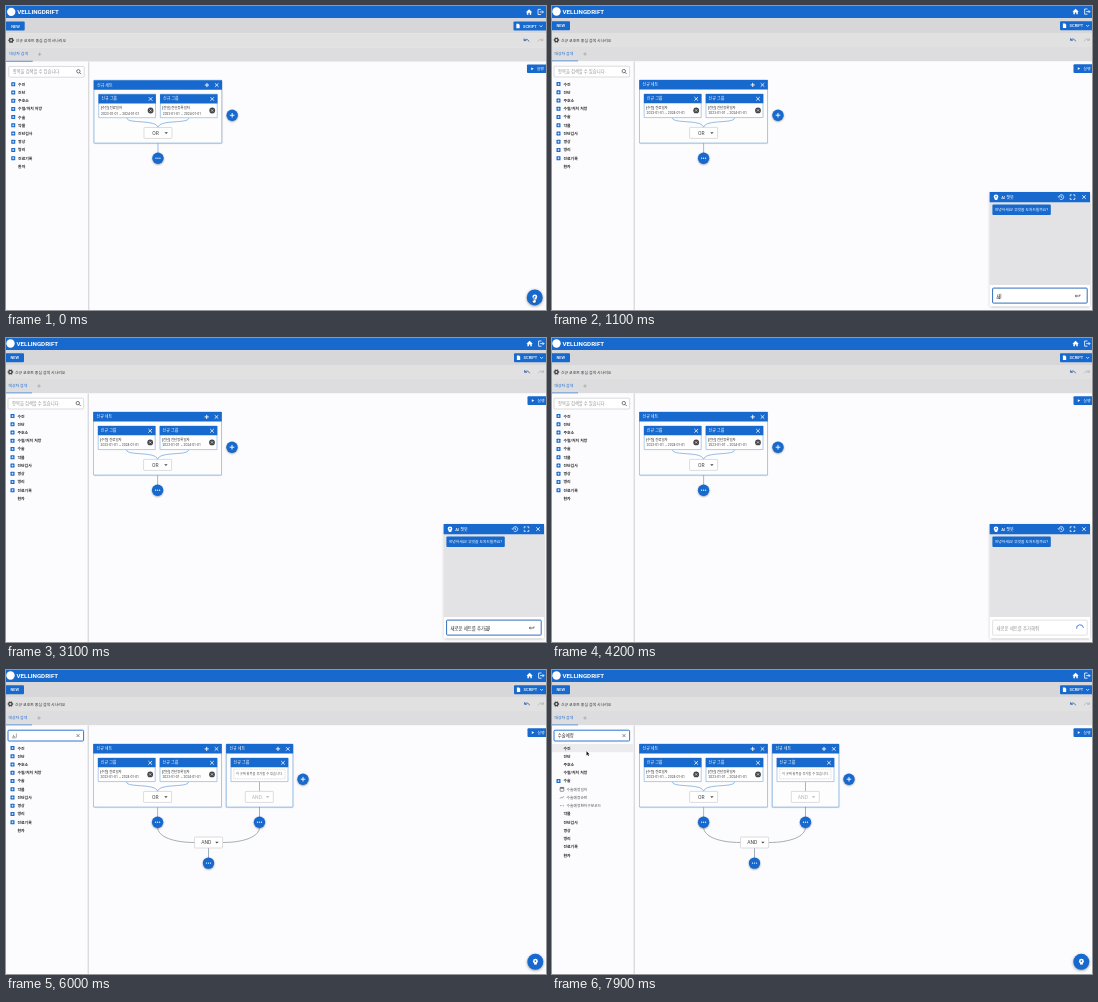
Recreate the animation shown at these times as an HTML page with a canvas. Size 540x304 px, loop 8 s.

```html
<!DOCTYPE html>
<html lang="ko">
<head>
<meta charset="utf-8">
<style>
html, body { margin: 0; width: 100%; height: 100%; overflow: hidden; background: #fcfbfd; }
canvas { display: block; width: 540px; height: 304px; }
</style>
</head>
<body>
<canvas id="stage"></canvas>
<script>
const W = 540, H = 304, LOOP = 8000;
const BLUE = '#1769cd', INK = '#2b2b2d', GREY = '#77777a', WHITE = '#fff', LINK = '#79aadd';
const canvas = document.getElementById('stage');
const ctx = canvas.getContext('2d');
const dpr = window.devicePixelRatio || 1;
canvas.width = W * dpr;
canvas.height = H * dpr;

const clamp = v => Math.min(1, Math.max(0, v));
const ease = v => { v = clamp(v); return v * v * (3 - 2 * v); };
const span = (t, from, to) => ease((t - from) / (to - from));

function rect(x, y, w, h, fill, stroke, radius = 0, lw = 0.6) {
  ctx.beginPath();
  ctx.roundRect(x, y, w, h, radius);
  if (fill) { ctx.fillStyle = fill; ctx.fill(); }
  if (stroke) { ctx.strokeStyle = stroke; ctx.lineWidth = lw; ctx.stroke(); }
}

function disc(x, y, r, fill) {
  ctx.beginPath();
  ctx.arc(x, y, r, 0, Math.PI * 2);
  ctx.fillStyle = fill;
  ctx.fill();
}

function path(d, color, x = 0, y = 0, lw = 0.8, filled = false) {
  const shape = new Path2D(d);
  ctx.save();
  ctx.translate(x, y);
  if (filled) { ctx.fillStyle = color; ctx.fill(shape); }
  else { ctx.strokeStyle = color; ctx.lineWidth = lw; ctx.stroke(shape); }
  ctx.restore();
}

// y is the vertical middle of the line; returns the width
function text(str, x, y, size, color = INK, weight = 400, align = 'left') {
  ctx.font = `${weight} ${size}px Roboto, "Noto Sans CJK KR", "Noto Sans CJK", sans-serif`;
  ctx.textAlign = align;
  ctx.fillStyle = color;
  ctx.fillText(str, x, y + size * 0.37);
  return ctx.measureText(str).width;
}

function shadowed(draw, blur = 2) {
  ctx.save();
  ctx.shadowColor = 'rgba(0,0,0,.4)';
  ctx.shadowBlur = blur * dpr;
  ctx.shadowOffsetY = 0.8 * dpr;
  draw();
  ctx.restore();
}

const cross = (x, y, r, color = WHITE, lw = 0.8) =>
  path(`M${-r} ${-r}L${r} ${r}M${r} ${-r}L${-r} ${r}`, color, x, y, lw);
const plus = (x, y, r, color = WHITE, lw = 0.9) =>
  path(`M${-r} 0H${r}M0 ${-r}V${r}`, color, x, y, lw);
const triangle = (x, y, color) => path('M-1.7 -.8H1.7L0 1Z', color, x, y, 0, true);

function roundButton(x, y, dots) {
  shadowed(() => disc(x, y, 5.7, BLUE));
  if (dots) for (const d of [-2, 0, 2]) disc(x + d, y, 0.65, WHITE);
  else plus(x, y, 2.3);
}

function headIcon(x, y, s) {
  disc(x, y - 0.3 * s, 2.2 * s, WHITE);
  rect(x - 1.2 * s, y + 0.8 * s, 2.5 * s, 2 * s, WHITE);
  disc(x, y - 0.3 * s, 0.75 * s, BLUE);
}

function header() {
  rect(-5, -5, 550, 17, BLUE);
  disc(4.5, 5.5, 4.2, WHITE);
  text('VELLINGDRIFT', 10.5, 5.6, 6.2, WHITE, 700);
  path('M-3.2 .2L0 -2.8L3.2 .2H2.2V2.7H.7V.8H-.7V2.7H-2.2V.2Z', WHITE, 523.6, 5.6, 0, true);
  path('M.5 -2.6H-2.4V2.6H.5M-.8 0H3M1.6 -1.4L3 0L1.6 1.4', WHITE, 535, 5.6);

  rect(-5, 12, 550, 15, '#d7d7d9');
  rect(-5, 15.2, 23, 9, BLUE, null, 1);
  text('NEW', 8.8, 19.7, 4, WHITE, 500, 'center');
  rect(508, 15.2, 37, 9, BLUE, null, 1);
  path('M-1.6 -2.2H.6L1.7 -1V2.2H-1.6Z', WHITE, 512.5, 19.7, 0, true);
  text('SCRIPT', 517.6, 19.7, 4, WHITE, 500);
  path('M-1.4 -.7L0 .7L1.4 -.7', WHITE, 535.6, 19.8);

  rect(-5, 27, 550, 14, '#e1e1e2');
  rect(-5, 41, 550, 14.2, '#dddddf');
  disc(4.4, 34, 2.3, '#444');
  for (let i = 0; i < 6; i++) disc(4.4 + 2.2 * Math.cos(i * Math.PI / 3), 34 + 2.2 * Math.sin(i * Math.PI / 3), 0.7, '#444');
  disc(4.4, 34, 0.95, '#e1e1e2');
  text('신규 코호트 중심 검색 시나리오', 9, 34.1, 3.9);
  const undo = 'M-2.4 -1.8V.3H-.2M-2.2 .1C-.8 -1.6 1.6 -1.2 2.6 1.3';
  path(undo, '#24569c', 521, 34);
  ctx.save();
  ctx.translate(535, 34);
  ctx.scale(-1, 1);
  path(undo, '#b3b3b6');
  ctx.restore();
  text('대상자 검색', 2.4, 47.8, 3.9, BLUE, 500);
  plus(33, 48, 1.7, '#98989b', 0.6);
  rect(-5, 54.6, 31, 0.9, BLUE);

  rect(521.5, 58.3, 25, 8.6, BLUE, null, 1);
  path('M-1.1 -1.4L1.3 0L-1.1 1.4Z', WHITE, 526.9, 62.6, 0, true);
  text('실행', 531.3, 62.6, 3.9, WHITE, 500);
}

const searchKeys = [[6000, 'ㅅ'], [6100, '수'], [6200, '수ㅅ'], [6300, '수술'], [6450, '수술예'], [6600, '수술예ㅈ'], [6700, '수술예정']];
const chatKeys = [[1000, 'ㅅ'], [1050, '새'], [1300, '새ㄹ'], [1500, '새로'], [1600, '새로우'], [1700, '새로운'], [1800, '새로운 '],
  [1900, '새로운 ㅅ'], [2000, '새로운 세'], [2200, '새로운 세ㅌ'], [2300, '새로운 세트'], [2500, '새로운 세트를'], [2700, '새로운 세트를 '],
  [2800, '새로운 세트를 추'], [2950, '새로운 세트를 추가'], [3100, '새로운 세트를 추가해'], [3300, '새로운 세트를 추가해줘']];
const typed = (keys, t) => keys.reduce((out, [at, str]) => t >= at ? str : out, '');

function composing(str, x, y, size, color = INK, underline = true) {
  const w = text(str, x, y, size, color);
  if (!underline || !str || str.endsWith(' ')) return;
  const last = ctx.measureText(str.slice(-1)).width;
  rect(x + w - last, y + 2.1, last, 0.45, INK);
  rect(x + w + 0.2, y - 2.2, 0.4, 4.4, INK);
}

const STEP = 8.23;
const rows = ['수진', '진단', '주호소', '수혈/처치 처방', '수술', '약물', '진단검사', '영상', '병리', '진료기록', '환자'];
const children = ['수술예정일자', '수술예정순번', '수술예정환자구분코드'];

function treeIcon(x, y) {
  rect(x - 2, y - 2, 4, 4, BLUE, null, 0.5);
  plus(x, y, 1.1, WHITE, 0.6);
}

function childIcon(kind, y) {
  if (kind === 0) {
    rect(8.1, y - 1.8, 3.7, 3.8, null, '#555', 0.3, 0.6);
    rect(8.1, y - 1.8, 3.7, 1.2, '#555');
  } else if (kind === 1) path('M-2 1.2L-.7 -.4L.4 .5L2 -1.3', '#666', 10, y, 0.6);
  else for (const d of [-1.4, 0, 1.4]) disc(10 + d, y, 0.45, '#555');
}

function sidebar(t) {
  rect(-5, 55.5, 87, 255, '#fcfbfd');
  rect(81.7, 55.5, 1, 255, '#cfcfd2');
  const focused = t >= 5800, filtering = t >= 6100;
  const query = typed(searchKeys, t);
  rect(2, 60.2, 75.6, 10.8, WHITE, focused ? BLUE : '#c3c3c6', 1, focused ? 0.9 : 0.6);
  if (query) {
    composing(query, 5.8, 65.6, 4.3, INK, t < 7000);
    cross(72, 65.6, 1.5, '#444', 0.6);
  } else {
    text('항목을 검색할 수 있습니다.', 6, 65.6, 4.3, '#929296');
    path('M1.3 0A1.7 1.7 0 1 1 -2.1 0A1.7 1.7 0 1 1 1.3 0M.8 1.2L2.5 2.9', '#444', 72.2, 65.1, 0.7);
  }

  const open = clamp((t - 6330) / 370) * STEP * 3;
  if (t >= 7300) rect(-5, 74, 86.5, STEP, '#ececee');
  rows.forEach((name, i) => {
    const y = 78.1 + i * STEP + (i > 4 ? open : 0);
    text(name, 11.4, y, 3.9, INK, 700);
    if (i < 10 && !filtering || i === 4 && t >= 6800) treeIcon(6.5, y);
  });
  if (t >= 6700) children.forEach((name, i) => {
    const y = 78.1 + (5 + i) * STEP;
    childIcon(i, y);
    text(name, 14.6, y, 3.75, '#58585b');
  });
}

function setBox(x, w) {
  shadowed(() => rect(x, 74, w, 63, WHITE), 1.5);
  rect(x, 74, w, 63, '#fdfdfe', LINK, 0);
  rect(x - 0.3, 74, w + 0.6, 9.5, BLUE);
  text('신규 세트', x + 3, 79, 4, WHITE, 500);
  plus(x + w - 14.8, 78.9, 2.1);
  cross(x + w - 5, 78.9, 1.8);
}

function group(x) {
  rect(x, 88, 57, 23.6, WHITE, LINK);
  rect(x - 0.3, 88, 57.6, 9.3, BLUE);
  text('신규 그룹', x + 2.6, 92.8, 4, WHITE, 500);
  cross(x + 52, 92.8, 1.8);
}

function item(x, label) {
  group(x);
  text(label, x + 2, 101.9, 3.4, INK, 500);
  text('2023-01-01 ~ 2024-01-01', x + 2.4, 107.2, 3.42, '#4c4c50');
  disc(x + 52, 104.4, 2.9, '#444447');
  cross(x + 52, 104.4, 1.1, WHITE, 0.6);
}

function operator(x, y, label, color = '#444') {
  rect(x, y, 28, 11, WHITE, '#c6c6c9', 0.6);
  text(label, x + 11.6, y + 5.6, 5, color, 400, 'center');
  triangle(x + 22.3, y + 5.6, color);
}

function diagram(added) {
  setBox(87.5, 128);
  path('M120.5 112C121 118 150 113 151.6 121.5C153 113 182 118 182.5 112M151.6 137V147', LINK);
  item(92.2, '[수진] 진료일자');
  item(154, '[진단] 진단등록일자');
  operator(137.6, 121.4, 'OR');
  if (added) {
    path('M151.6 157C151.6 167 168 172.5 188.5 172.5M253.5 157C253.5 167 237 172.5 217 172.5M202.5 178V188M253.5 137V147', '#8f9aa6');
    setBox(220.4, 66.4);
    path('M253.5 112V121.4', LINK);
    group(225);
    ctx.setLineDash([1, 0.8]);
    rect(227.8, 99.2, 51.2, 9.7, null, '#b5b5b8', 0, 0.5);
    ctx.setLineDash([]);
    text('이 곳에 항목을 추가할 수 있습니다.', 253.4, 104.1, 3.25, '#555559', 400, 'center');
    operator(239.3, 121.4, 'AND', '#b4b4b7');
    operator(188.6, 167, 'AND');
    roundButton(253.5, 152.2, true);
    roundButton(202.5, 193.1, true);
  }
  roundButton(151.6, 152.2, true);
  roundButton(added ? 297 : 226, 109.2, false);
}

// [indent level, line]
const reply = [[0, '이름: 신규 세트'], [0, '설명: null'], [0, '내부 연산자: AND'], [0, '외부 연산자: AND'], [0, '그룹:'],
  [1, '이름: 신규 그룹'], [2, '내부 연산자: AND'], [2, '항목: 진료일자, 진단등록일자'], [2, '도메인: 수진, 진단'],
  [1, '이름: 신규 세트 (대량의 질의)'], [0, '참조 조인 타입: INNER']];

function chat(t, answered) {
  shadowed(() => rect(437.6, 186, 100.4, 114.6, WHITE), 3);
  rect(437.6, 196, 100.4, 83, '#e3e3e5');
  if (answered) {
    rect(440.4, 196, 94.6, 81.3, BLUE, null, 1);
    text('새로운 세트는 다음과 같습니다.', 442.8, 200, 3.75, WHITE);
    reply.forEach(([level, line], i) => {
      const x = 443.7 + level * 4.1, y = 211.9 + i * 6;
      disc(x, y, 0.6, WHITE);
      text(line, x + 3.9, y, 3.75, WHITE);
    });
  } else {
    rect(440.4, 198.6, 58.4, 10.4, BLUE, null, 1);
    text('안녕하세요! 무엇을 도와드릴까요?', 442.9, 203.9, 3.77, WHITE);
  }
  rect(437.6, 186, 100.4, 10.2, BLUE);
  headIcon(444, 191, 1.05);
  text('AI 챗봇', 449.3, 191.1, 4.1, WHITE, 500);
  path('M-2.3 -.3A2.4 2.4 0 1 1 -1.5 1.8M-3.2 -.7L-2.3 .4L-1.2 -.7M0 -1.4V.2L1.1 .8', WHITE, 509.2, 191.1, 0.7);
  path('M-2.3 -.8V-2.3H-.8M.8 -2.3H2.3V-.8M2.3 .8V2.3H.8M-.8 2.3H-2.3V.8', WHITE, 520.5, 191.1);
  cross(532, 191.1, 1.8);

  const sending = t >= 3500 && !answered;
  rect(440.6, 282.1, 94.6, 15, WHITE, sending ? '#cfcfd2' : '#1b5eb4', 0.8, sending ? 0.6 : 0.9);
  if (sending) {
    text('새로운 세트를 추가해줘', 444.5, 289.9, 4.4, '#929296');
    const turn = (t - 4200) / 1400 * Math.PI * 2;
    ctx.beginPath();
    ctx.arc(528, 290.2, 3.4, turn - 3.3, turn - 0.1);
    ctx.strokeStyle = BLUE;
    ctx.lineWidth = 0.8;
    ctx.stroke();
  } else {
    if (!answered) composing(typed(chatKeys, t), 444.5, 289.9, 4.4);
    path('M2.4 -1.3V.2H-2.2M-.9 -1.1L-2.2 .2L-.9 1.5', '#3d3d40', 525.5, 289.8, 0.7);
  }
}

function helpButton() {
  shadowed(() => disc(529.3, 291.8, 8, BLUE), 3);
  headIcon(529.4, 291.5, 1.1);
}

function arrowCursor(x, y) {
  path('M0 0V4.2L1 3.3L1.7 4.9L2.4 4.6L1.7 3.1H3Z', '#111', x, y, 0, true);
}

function handCursor(x, y) {
  const hand = 'M-.5 -2.3H.5V-.3L2 .1V2L1.3 3.2H-.9L-2 .9L-.5 .6Z';
  path(hand, WHITE, x, y, 0, true);
  path(hand, '#222', x, y, 0.4);
}

function draw(t) {
  ctx.setTransform(dpr, 0, 0, dpr, 0, 0);
  rect(0, 0, W, H, '#fcfbfd');
  const zoom = 0.9975 + 0.0025 * span(t, 100, 900);
  ctx.translate(300, 150);
  ctx.scale(zoom, zoom);
  ctx.translate(-300, -150);

  const answered = t >= 4900;
  header();
  sidebar(t);
  diagram(answered);
  if (t >= 400 && t < 5600) chat(t, answered);
  else helpButton();
  if (t < 400) handCursor(528.6, 294.2);
  if (t >= 7200) {
    const k = span(t, 7200, 7700);
    arrowCursor(39 - 4.5 * k, 68 + 13.2 * k);
  }
}

function frame(now) {
  draw(now % LOOP);
  requestAnimationFrame(frame);
}
draw(0);
requestAnimationFrame(frame);
</script>
</body>
</html>
```
